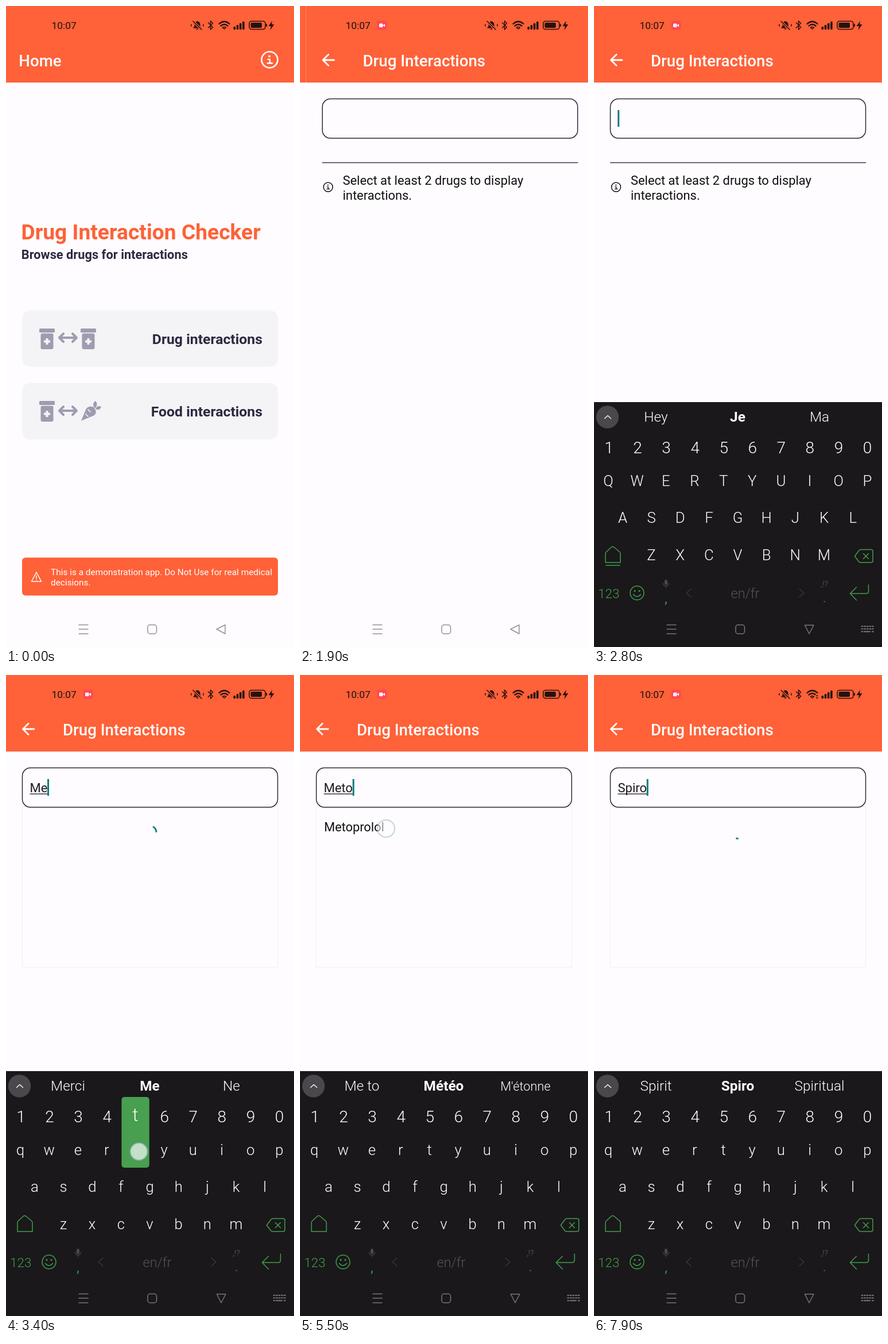
An HTML page for the animation above (8 s loop, 502 by 1115 pixels).

```html
<!DOCTYPE html>
<html lang="en">
<head>
<meta charset="utf-8">
<title>Drug Interaction Checker</title>
<style>
  html, body { margin: 0; width: 100%; height: 100%; overflow: hidden; background: #fefcfe; }
  svg { display: block; width: 100%; height: 100%; font-family: Roboto, sans-serif; }
  text { white-space: pre; }
  .mid { text-anchor: middle; }
  .line { fill: none; stroke-linecap: round; stroke-linejoin: round; }
  .key { font-weight: 300; fill: #fff; text-anchor: middle; }
</style>
</head>
<body>
<svg id="stage" viewBox="0 0 502 1115" preserveAspectRatio="none"></svg>
<script>
const LOOP = 8000, STEP = 100;
const ORANGE = "#ff6138", INK = "#2d2940", PAPER = "#fefcfe", MUTED = "#9f9bb0", BLACK = "#241310",
      PANEL = "#f4f3f6", TEAL = "#0f7c7c", GREEN = "#419e48", DARK = "#1a181b";

// Markup helpers
const text = (x, y, size, str, attrs = "") => `<text x="${x}" y="${y}" font-size="${size}" ${attrs}>${str}</text>`;
const rect = (x, y, w, h, r, fill, attrs = "") =>
  `<rect x="${x}" y="${y}" width="${w}" height="${h}" rx="${r}" fill="${fill}" ${attrs}/>`;
const line = (d, color, width, attrs = "") =>
  `<path class="line" d="${d}" stroke="${color}" stroke-width="${width}" ${attrs}/>`;
const shape = (d, fill) => `<path d="${d}" fill="${fill}"/>`;
const circle = (x, y, r, fill, attrs = "") => `<circle cx="${x}" cy="${y}" r="${r}" fill="${fill}" ${attrs}/>`;
const group = (id, body) => `<g id="${id}">${body}</g>`;

const bottle = (x, y) =>
  rect(x, y, 27, 7, 1.5, MUTED) + rect(x + 2.5, y + 8.5, 22, 27.5, 3, MUTED) +
  line(`M${x + 13.5} ${y + 17}v11m-5.5-5.5h11`, PANEL, 4, 'style="stroke-linecap:butt"');
const swap = y => line(`M93 ${y}H123M100 ${y - 7}l-7 7 7 7M116 ${y - 7}l7 7-7 7`, MUTED, 4);
const carrot =
  shape("M131 721.5L140 700Q146 694 153 698Q160 706 154 712Z", MUTED) +
  line("M143 702l4 4M139 710l4 4", PANEL, 1.6) +
  shape("M154 699Q149 691 156 687Q161 692 156 699ZM156 700Q160 694 166 697Q163 705 156 701Z", MUTED);
const info = (x, y, r, color, w) => circle(x, y, r, "none", `stroke="${color}" stroke-width="${w}"`) +
  circle(x - r * .03, y - r * .43, r * .14, color) +
  line(`M${x - r * .22} ${y - r * .05}h${r * .25}v${r * .48}m${-r * .3} 0h${r * .6}`, color, w * .85);
const header = rect(0, 133, 502, 1.5, 0, "#f1e9ec") + rect(0, 0, 502, 133, 0, ORANGE);
const title = (x, str) => text(x, 104.7, 27.7, str, 'fill="#fff" font-weight="500"');

const home = rect(0, 0, 502, 1115, 0, PAPER) + header + title(22.3, "Home") + info(459.5, 93.5, 14, "#fff", 2.7) +
  text(26.5, 406, 37.2, "Drug Interaction Checker", `fill="${ORANGE}" font-weight="700"`) +
  text(26.8, 440, 21.8, "Browse drugs for interactions", `fill="${INK}" font-weight="700"`) +
  rect(28, 529.5, 446, 98, 14, PANEL, 'id="press"') + rect(28, 656, 446, 98, 14, PANEL) +
  bottle(58, 561) + swap(577) + bottle(130, 561) +
  bottle(58, 687) + swap(704) + carrot +
  text(447, 588, 24.8, "Drug interactions", `fill="${INK}" font-weight="700" text-anchor="end"`) +
  text(447, 714, 24.8, "Food interactions", `fill="${INK}" font-weight="700" text-anchor="end"`) +
  rect(28, 959.5, 446, 66, 6, ORANGE) +
  line("M53 985L44.500 1001H61.500ZM53 991v5M53 998.500v.1", "#fff", 1.5) +
  text(78, 990, 15.4, "This is a demonstration app. Do Not Use for real medical", 'fill="#fff"') +
  text(78, 1008, 15.4, "decisions.", 'fill="#fff"');

const page = rect(0, 0, 502, 1115, 0, PAPER) + rect(0, 689, 502, 426, 0, "#f9f8fb", 'id="inset"') + header +
  line("M49 94H30M39 84.500L29.500 94L39 103.500", "#fff", 2.8) + title(99, "Drug Interactions") +
  group("chip", rect(28, 245, 169, 56, 12, PANEL) + text(41.5, 282, 21.8, "Metoprolol", 'fill="#111"') +
    circle(172, 273, 9.7, MUTED) + line("M168.500 269.500l7 7m0-7l-7 7", PANEL, 2.2)) +
  group("hint", line("M28 272.500H474", "#3a3650", 1.6, 'style="stroke-linecap:butt"') + info(38.5, 315, 8, "#111", 1.5) +
    text(64, 311, 21.9, "Select at least 2 drugs to display", 'fill="#111"') +
    text(64, 336.5, 21.9, "interactions.", 'fill="#111"')) +
  group("dropdown", rect(28.5, 226, 445, 282.5, 0, PAPER, 'stroke="#f2f0f5"') +
    `<path id="spinner" fill="none" stroke="${TEAL}" stroke-width="2.8" stroke-linecap="square"/>` +
    text(42, 272, 21.8, "Metoprolol", 'id="result" fill="#111"')) +
  rect(28.5, 161.5, 445, 68.5, 14, PAPER, 'stroke="#2b283a" stroke-width="1.5"') +
  text(41.5, 204, 22, "", 'id="typed" fill="#1c1a22"') +
  rect(41.5, 206.2, 0, 1.3, 0, "#1c1a22", 'id="underline"') +
  rect(42, 181, 3, 29, 0, TEAL, 'id="caret"');

// Keyboard: rows of [letters, first x, y]
const rows = [["qwertyuiop", 25, 826], ["asdfghjkl", 50, 890], ["zxcvbnm", 100, 955]];
const keys = {};
for (const [letters, x, y] of rows)
  [...letters].forEach((c, i) => keys[c] = { x: x + 50.15 * i, y });
const greenLine = d => line(d, GREEN, 1.5);
const keyboard = rect(0, 689, 502, 440, 0, DARK) +
  circle(23.5, 715, 19.7, "#4a484c") + line("M18.500 717.500l5.500-5 5.500 5", "#fff", 1.3) +
  [0, 1, 2].map(i => text(108 + 142.5 * i, 723, 24.4, "",
    `class="mid sug" fill="#fff" font-weight="${i == 1 ? 700 : 300}"`)).join("") +
  [..."1234567890"].map((c, i) => text(26 + 50.05 * i, 778, 28, c, 'class="key"')).join("") +
  Object.entries(keys).map(([c, k]) => text(k.x, k.y + 9, 25.8, c, 'class="key letter"')).join("") +
  greenLine("M20 968V953Q20 951 21 950L30 941.500Q32.500 939.500 35 941.500L45 950Q46 951 46 953V968Z") +
  group("shift", greenLine("M21 973H45")) +
  greenLine("M454.500 957L462 947Q463 945.500 465 945.500H483Q486 945.500 486 948.500V965Q486 968 483 968H465Q463 968 462 967Z") +
  greenLine("M469.500 952.500l9 9m0-9l-9 9") +
  text(7, 1029.5, 22.5, "123", `fill="${GREEN}" font-weight="300"`) +
  circle(75, 1021, 12, "none", `stroke="${GREEN}" stroke-width="1.5"`) +
  greenLine("M68.500 1023.500Q75 1031 81.500 1023.500") + circle(71, 1017.5, 1.5, GREEN) + circle(79, 1017.5, 1.5, GREEN) +
  rect(123, 998, 5, 9, 2.5, "#4b494c") + line("M120.500 1004Q121 1009 125.500 1009Q130 1009 130.500 1004M125.500 1009v3", "#4b494c", 1.2) +
  text(125.5, 1039, 23, ",", `class="mid" fill="${GREEN}"`) +
  line("M169 1014l-8 7 8 7M358 1014l8 7-8 7", "#39373a", 1.4) +
  text(263.5, 1029.5, 23.4, "en/fr", 'class="mid" fill="#555356" font-weight="300"') +
  text(401.5, 1011, 14, ",!?", 'class="mid" fill="#4b494c"') +
  text(401.5, 1037, 18, ".", `class="mid" fill="${GREEN}"`) +
  greenLine("M478.500 1007v11q0 4-4 4H446.500M457.500 1011l-11 11 11 11.500") +
  group("popup", rect(-24.2, -92, 48.4, 123, 5, "#479f4f") + text(0, -50, 31, "", 'class="key" id="popupLabel"'));

const slash = "M326 26.500L341 41";
const status = text(79.5, 40, 17.4, "10:07", 'fill="#1c1210"') +
  group("recorder", rect(134.5, 25.5, 17, 16, 4, "#ff4852") + rect(138, 30.5, 6.5, 6.5, 1.5, "#fff") +
    shape("M144.500 33.500l3.500-2.500v5.500Z", "#fff")) +
  shape("M326 38.500L328.500 35V32Q329 27 333.500 26.500Q338 27 338.500 32V35L341 38.500ZM331 39.500h5q-2.500 3-5 0Z", BLACK) +
  line(slash, ORANGE, 4) + line(slash, BLACK, 1.6) + line("M323 32v3M344 32v3", BLACK, 1.5) +
  line("M352.500 29l8 8-4 4V26l4 4-8 8", BLACK, 1.5) +
  line("M371.500 31Q380.500 23 389.500 31M374.500 34.500Q380.500 29.500 386.500 34.500", BLACK, 2.3) +
  line("M377.500 37.500Q380.500 35.500 383.500 37.500L380.500 40Z", BLACK, 1.6) +
  group("traffic", rect(386, 34, 6, 8, 0, ORANGE) + shape("M386.500 37l2.200-2.500 2.200 2.500ZM386.500 39l2.200 2.500 2.200-2.500Z", BLACK)) +
  [0, 1, 2, 3].map(i => rect(396.5 + 5.2 * i, 36 - 3 * i, 3.6, 5 + 3 * i, 1.2, BLACK)).join("") +
  rect(424, 26.5, 28, 14, 4, "none", `stroke="${BLACK}" stroke-width="1.6"`) +
  rect(426.5, 29, 19.5, 9, 2, BLACK) + rect(453, 31, 2, 5, 1, BLACK) +
  shape("M464 26L457.500 35H462L460.500 42L467.500 32H463Z", BLACK);

const dots = [0, 1, 2].map(r => [0, 1, 2, 3, 4].map(i =>
  r == 2 && i && i < 4 ? "" : `M${466.5 + 4.6 * i} ${1079 + 4.6 * r}h2`).join("")).join("") + "M471 1088.200h10";
const nav = `<g class="line" stroke-width="1.5">
  <path d="M127 1076.500h16M127 1084h16M127 1092h16"/>
  <rect x="247" y="1076.500" width="15.500" height="15.500" rx="4"/>
  <path id="back" d="M367 1084L382 1076.500V1092Z"/>
  <path id="switcher" d="${dots}" stroke-width="2"/></g>`;

const touches = [0, 1, 2].map(() => circle(0, 0, 15, "#fff",
  'class="touch" fill-opacity=".68" stroke="#8fa6c4" stroke-opacity=".5" stroke-width="2.500"')).join("");

stage.innerHTML = group("homeView", home) + group("pageView", page) + group("kb", keyboard) +
  group("navBar", nav) + group("statusBar", status) + touches;

// Timeline
const typing = [
  [0, "", "Hey,Je,Ma"], [3090, "M", "Ma,M,Me"], [3290, "Me", "Merci,Me,Ne"], [3490, "Met", "Mettre,Met,Mets"],
  [4190, "Meto", "Me to,Météo,M'étonne"], [5590, "", "Hey,Je,Ma"], [6570, "S", "Hey,Je,Ma"],
  [6690, "Sp", "Sport,Sp,Spécial"], [6990, "Spi", "Spirit,Spi,Épi"], [7190, "Spir", "Spirit,Spir,Spirale"],
  [7480, "Spiro", "Spirit,Spiro,Spiritual"]
];
// start, end, key, finger offset from the key
const presses = [
  [2990, 3090, "m", 2, 1], [3190, 3290, "e", 4, 0], [3380, 3490, "t", 6, 3], [4080, 4190, "o", 2, 2],
  [6460, 6570, "s", 8, -7], [6580, 6690, "p", -9, -3], [6880, 6990, "i", 1, 2], [7090, 7190, "r", 2, 2], [7380, 7480, "o", 1, 1]
];
const fingers = [[1390, 1500, 338, 578], [5380, 5490, 150, 267],
  ...presses.map(([a, b, c, dx, dy]) => [a, b, keys[c].x + dx, keys[c].y + dy])];
const searches = [[3250, 5590, 5090], [6685, LOOP, LOOP]]; // open, close, results in

const $ = id => document.getElementById(id);
const show = (id, on) => $(id).style.display = on ? "" : "none";
const ramp = (t, a, b) => Math.min(1, Math.max(0, (t - a) / (b - a)));

// cubic-bezier(.4, 0, .2, 1)
function ease(x) {
  let lo = 0, hi = 1, s = .5;
  for (let i = 0; i < 18; i++) {
    s = (lo + hi) / 2;
    const bx = 1.2 * s * (1 - s) ** 2 + .6 * s * s * (1 - s) + s ** 3;
    bx < x ? lo = s : hi = s;
  }
  return 3 * s * s * (1 - s) + s ** 3;
}

function spinnerArc(age) {
  const u = age / 1333 % 1;
  const base = 90 * u + age * .162;
  const tail = base + 270 * ease(ramp(u, .5, 1));
  const head = Math.max(tail + 8, base + 270 * ease(ramp(u, 0, .5)));
  const at = deg => {
    const a = deg * Math.PI / 180;
    return `${251 + 11 * Math.sin(a)} ${273.5 - 11 * Math.cos(a)}`;
  };
  return `M${at(tail)}A11 11 0 ${head - tail > 180 ? 1 : 0} 1 ${at(head)}`;
}

const sugs = [...document.querySelectorAll(".sug")], letters = [...document.querySelectorAll(".letter")],
      touchDots = [...document.querySelectorAll(".touch")];

function drawKeyboard(t, typed, words) {
  const u = ramp(t, 2250, 2750);
  show("kb", u > 0);
  $("kb").setAttribute("transform", `translate(0 ${426 * (1 - u) ** 1.78})`);
  $("kb").setAttribute("opacity", Math.min(1, u * 1.84));
  const upper = typed === "";
  const cased = c => upper ? c.toUpperCase() : c;
  Object.keys(keys).forEach((c, i) => letters[i].textContent = cased(c));
  show("shift", upper);
  words.split(",").forEach((w, i) => {
    sugs[i].textContent = w;
    sugs[i].setAttribute("font-size", w === "M'étonne" ? 21.8 : 24.4);
  });
  const press = presses.find(([a, b]) => t >= a && t < b);
  show("popup", press);
  if (press) {
    const k = keys[press[2]];
    $("popup").setAttribute("transform", `translate(${k.x} ${k.y})`);
    $("popupLabel").textContent = cased(press[2]);
  }
}

function drawNav(t) {
  const sliding = t >= 2270 && t < 2650;
  $("navBar").setAttribute("stroke", sliding ? "#141214" : t < 2270 ? "#929094" : "#77757a");
  $("back").setAttribute("transform", `rotate(${-90 * ramp(t, 2450, 2800)} 375 1084)`);
  show("switcher", t >= 2300);
}

function drawField(t, typed) {
  $("typed").textContent = typed;
  const width = typed ? $("typed").getComputedTextLength() : 0;
  $("underline").setAttribute("width", width);
  $("caret").setAttribute("x", 41.2 + width);
  show("caret", t >= 2200);
}

function drawTouches(t) {
  const live = fingers.filter(([a, b]) => t >= a && t < b + 110);
  touchDots.forEach((dot, i) => {
    dot.style.display = live[i] ? "" : "none";
    if (!live[i]) return;
    const [, end, x, y] = live[i];
    dot.setAttribute("cx", x);
    dot.setAttribute("cy", y);
    dot.setAttribute("opacity", 1 - ramp(t, end - 10, end + 110));
  });
}

function draw(t) {
  const [, typed, words] = typing.findLast(([at]) => t >= at);
  const enter = ramp(t, 1690, 2100);
  $("recorder").setAttribute("opacity", ramp(t, 280, 480));
  show("traffic", t >= 6290);
  $("press").setAttribute("fill", t >= 1390 && t < 1800 ? "#f6e8e4" : PANEL);
  show("pageView", enter > 0);
  $("pageView").setAttribute("opacity", Math.min(1, enter * 2));
  $("pageView").setAttribute("transform", `translate(${50 * (1 - ease(enter))} 0)`);
  show("inset", t >= 2280);

  const chosen = t >= 5590;
  show("chip", chosen);
  $("hint").setAttribute("transform", `translate(0 ${chosen ? 57 : 0})`);
  const search = searches.find(([a, b]) => t >= a && t < b);
  show("dropdown", search);
  if (search) {
    show("spinner", t < search[2]);
    show("result", t >= search[2]);
    $("spinner").setAttribute("d", spinnerArc(t - search[0]));
  }
  drawField(t, typed);
  drawKeyboard(t, typed, words);
  drawNav(t);
  drawTouches(t);
}

const begin = performance.now();
function tick() {
  const t = performance.now() - begin + 20;
  draw(Math.floor(t / STEP) * STEP % LOOP);
  requestAnimationFrame(tick);
}
tick();
</script>
</body>
</html>
```
